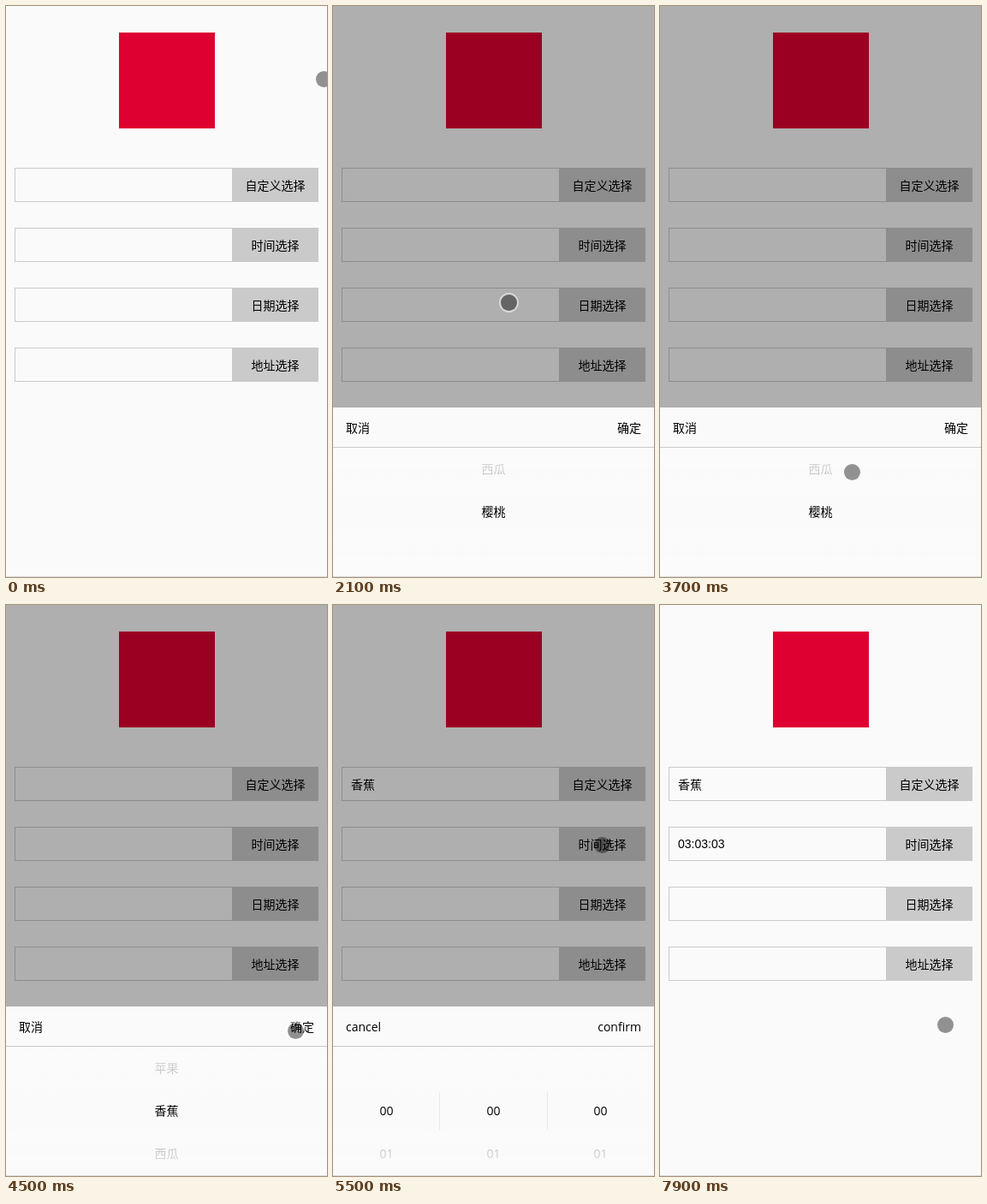
An HTML page that plays this animation: 375 px wide and 667 px high, repeating every 8000 ms.

```html
<!DOCTYPE html>
<html lang="zh-CN">
<head>
<meta charset="utf-8">
<title>Picker demo</title>
<style>
  html, body { margin: 0; width: 100%; height: 100%; overflow: hidden; }
  body {
    position: relative;
    background: #fafafa;
    color: #000;
    font: 14px/40px "Open Sans", "Noto Sans CJK SC", "Noto Sans CJK", sans-serif;
  }
  div, span { box-sizing: border-box; }

  .logo {
    position: absolute; left: 132px; top: 31px;
    width: 112px; height: 112px;
    background: #dd0031;
  }

  .row {
    position: absolute; left: 10px;
    width: 355px; height: 40px;
    border: 1px solid #cacaca;
    line-height: 39px;
  }
  .row b {
    position: absolute; right: -1px; top: -1px;
    width: 101px; height: 40px;
    background: #cacaca;
    font-weight: 400; line-height: 41px; text-align: center;
  }
  .row span { position: absolute; left: 10px; top: 0; }
  .digits { font-family: "Liberation Sans", Arial, sans-serif; }

  .popup { position: absolute; inset: 0; background: rgba(0, 0, 0, .3); }
  .panel {
    position: absolute; left: 0; top: 469px;
    width: 375px; height: 198px;
    background: #fafafa;
    overflow: hidden;
  }
  .head {
    display: flex; justify-content: space-between;
    height: 47px; padding: 0 15px;
    border-bottom: 1px solid #cacaca;
    line-height: 47px;
  }
  .wheels {
    position: relative; display: flex;
    height: 151px; overflow: hidden;
  }
  .wheel {
    flex: 1; padding-top: 50px;
    line-height: 50px; text-align: center; white-space: pre;
  }
  /* fades the items above and below the selected one */
  .wheels::after {
    content: ""; position: absolute; inset: 0;
    background: linear-gradient(
      rgba(250, 250, 250, .95), rgba(250, 250, 250, .7) 50px,
      transparent 50px, transparent 100px,
      rgba(250, 250, 250, .7) 100px, rgba(250, 250, 250, .95));
  }
  .bar {
    position: absolute; top: 53px; z-index: 1;
    width: 1px; height: 44px; background: #e8e8e8;
  }
  .foot {
    position: absolute; left: 0; top: 666px;
    width: 375px; height: 1px; background: #dedede;
  }

  .touch {
    position: absolute; left: -9px; top: -9px;
    width: 19px; height: 19px; border-radius: 50%;
    background: rgba(0, 0, 0, .42);
    animation: move 8s infinite, press 8s step-end infinite;
  }

  .popup, .fruit-value, .time-value { visibility: hidden; animation: 8s step-end infinite; }
  .fruit-popup { animation-name: fruit-popup; }
  .time-popup { animation-name: time-popup; }
  .fruit-value { animation-name: fruit-value; }
  .time-value { animation-name: time-value; }
  .fruit { animation: fruit 8s infinite; }
  .hour { animation: hour 8s infinite; }
  .minute { animation: minute 8s infinite; }
  .second { animation: second 8s infinite; }

  @keyframes fruit-popup {
    0%, 32.5%, 60%, 100% { visibility: hidden; }
    10%, 41.25% { visibility: visible; }
  }
  @keyframes time-popup {
    0%, 98.75%, 100% { visibility: hidden; }
    68.75% { visibility: visible; }
  }
  @keyframes fruit-value {
    0% { visibility: hidden; }
    60%, 100% { visibility: visible; }
  }
  @keyframes time-value {
    0% { visibility: hidden; }
    98.75%, 100% { visibility: visible; }
  }

  /* wheels and touch advance in 100 ms ticks */
  @keyframes fruit {
    0%, 20% { translate: 0 0; animation-timing-function: steps(1); }
    21.25% { translate: 0 -26px; animation-timing-function: steps(3); }
    25% { translate: 0 -150px; animation-timing-function: steps(1); }
    47.5% { translate: 0 -150px; animation-timing-function: steps(2); }
    50%, 100% { translate: 0 -50px; }
  }
  @keyframes minute {
    0%, 73.75% { translate: 0 0; animation-timing-function: steps(2); }
    76.25%, 100% { translate: 0 -150px; }
  }
  @keyframes hour {
    0%, 78.75% { translate: 0 0; animation-timing-function: steps(2); }
    81.25%, 100% { translate: 0 -150px; }
  }
  @keyframes second {
    0%, 86.25% { translate: 0 0; animation-timing-function: steps(2); }
    88.75%, 100% { translate: 0 -150px; }
  }

  @keyframes move {
    0% { translate: 371px 85px; animation-timing-function: steps(6); }
    7.5% { translate: 308px 222px; animation-timing-function: steps(1); }
    10% { translate: 306px 212px; animation-timing-function: steps(8); }
    20% { translate: 216px 539px; animation-timing-function: steps(1); }
    21.25% { translate: 216px 513px; animation-timing-function: steps(4); }
    26.25% { translate: 205px 346px; animation-timing-function: steps(1); }
    31.25% { translate: 205px 346px; animation-timing-function: steps(6); }
    38.75% { translate: 307px 212px; animation-timing-function: steps(1); }
    40% { translate: 307px 212px; animation-timing-function: steps(5); }
    46.25% { translate: 224px 544px; animation-timing-function: steps(1); }
    47.5% { translate: 222px 542px; animation-timing-function: steps(2); }
    50% { translate: 220px 642px; animation-timing-function: steps(1); }
    51.25% { translate: 266px 590px; animation-timing-function: steps(4); }
    56.25% { translate: 338px 497px; animation-timing-function: steps(1); }
    60% { translate: 338px 494px; animation-timing-function: steps(5); }
    66.25% { translate: 314px 280px; animation-timing-function: steps(1); }
    70% { translate: 314px 280px; animation-timing-function: steps(3); }
    73.75% { translate: 190px 639px; animation-timing-function: steps(2); }
    76.25% { translate: 187px 489px; animation-timing-function: steps(2); }
    78.75% { translate: 40px 639px; animation-timing-function: steps(2); }
    81.25% { translate: 37px 489px; animation-timing-function: steps(3); }
    85% { translate: 298px 585px; animation-timing-function: steps(1); }
    86.25% { translate: 300px 642px; animation-timing-function: steps(2); }
    88.75% { translate: 300px 464px; animation-timing-function: steps(3); }
    92.5% { translate: 329px 474px; animation-timing-function: steps(2); }
    95% { translate: 333px 489px; animation-timing-function: steps(1); }
    98.75%, 100% { translate: 333px 490px; }
  }
  @keyframes press {
    0%, 11.25%, 32.5%, 41.25%, 51.25%, 60%, 68.75%, 77.5%, 82.5%, 90%, 98.75%, 100% {
      box-shadow: none;
    }
    10%, 20%, 38.75%, 47.5%, 56.25%, 66.25%, 73.75%, 78.75%, 86.25%, 95% {
      box-shadow: 0 0 0 2px rgba(255, 255, 255, .5);
    }
  }
</style>
</head>
<body>
  <div class="logo"></div>

  <div class="row" style="top:189px"><span class="fruit-value">香蕉</span><b>自定义选择</b></div>
  <div class="row" style="top:259px"><span class="time-value digits">03:03:03</span><b>时间选择</b></div>
  <div class="row" style="top:329px"><b>日期选择</b></div>
  <div class="row" style="top:399px"><b>地址选择</b></div>

  <div class="popup fruit-popup">
    <div class="panel">
      <div class="head"><span>取消</span><span>确定</span></div>
      <div class="wheels">
        <div class="wheel fruit">苹果
香蕉
西瓜
樱桃</div>
      </div>
    </div>
  </div>

  <div class="popup time-popup">
    <div class="panel">
      <div class="head"><span>cancel</span><span>confirm</span></div>
      <div class="wheels">
        <div class="wheel hour"></div>
        <div class="wheel minute"></div>
        <div class="wheel second"></div>
        <div class="bar" style="left:124px"></div>
        <div class="bar" style="left:250px"></div>
      </div>
    </div>
  </div>

  <div class="foot"></div>
  <div class="touch"></div>

  <script>
    const fill = (name, count) => {
      const items = Array.from({ length: count }, (_, i) => String(i).padStart(2, "0"));
      document.querySelector("." + name).textContent = items.join("\n");
    };
    fill("hour", 24);
    fill("minute", 60);
    fill("second", 60);
  </script>
</body>
</html>
```
